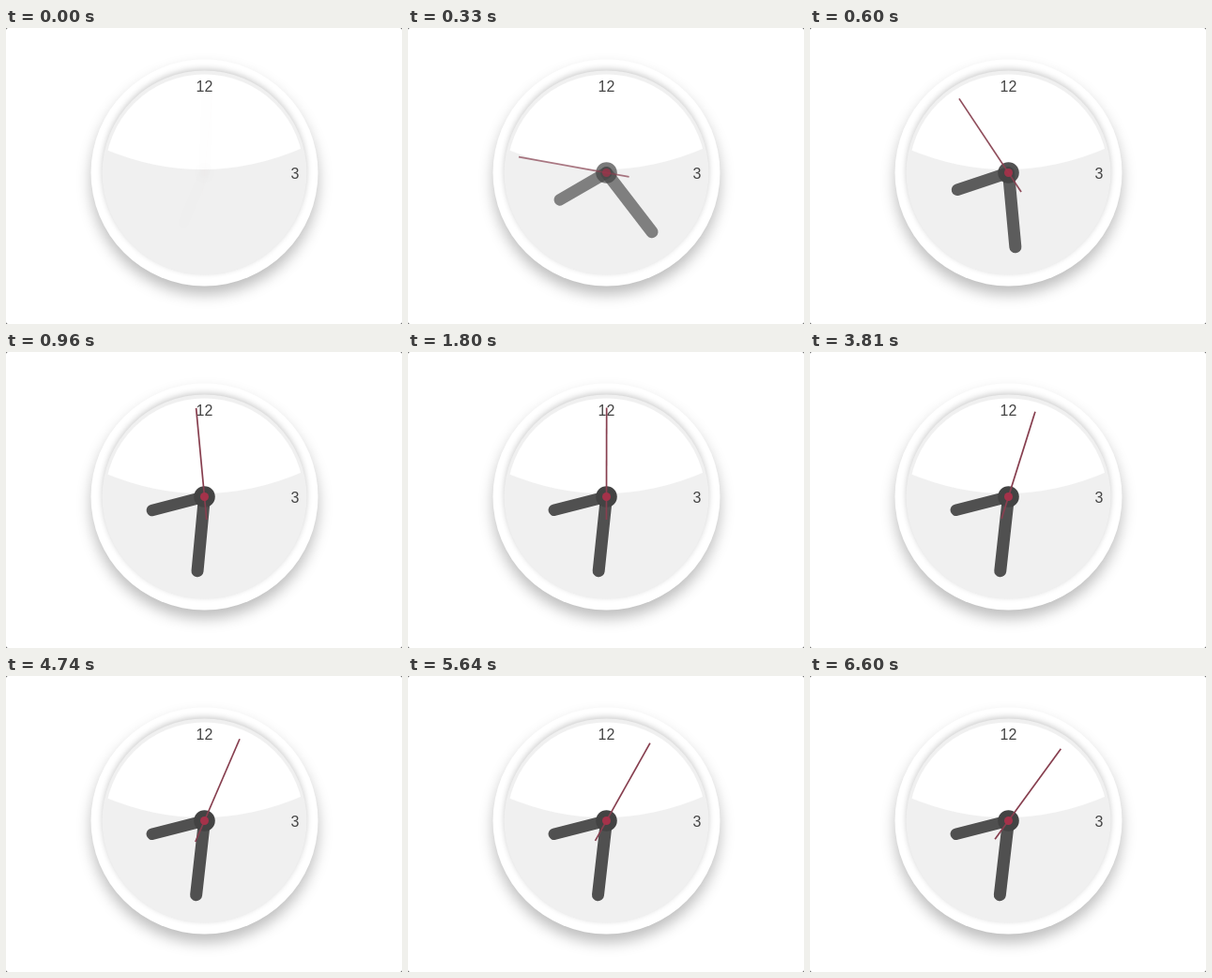
An HTML page with a canvas that plays this animation: 422x316 px, repeating every 6.75 s.

```html
<!DOCTYPE html>
<html lang="en">
<head>
<meta charset="utf-8">
<title>Wall clock</title>
<style>
html, body { margin: 0; width: 100%; height: 100%; overflow: hidden; background: #333; }
canvas { display: block; border-radius: 2px; }
</style>
</head>
<body>
<canvas id="stage" width="422" height="316"></canvas>
<script>
const LOOP = 6750, SETTLE = 1320, TICK_START = 1800, TICK = 900, TICK_MOVE = 300;
const CX = 211.5, CY = 154.5;
const ctx = document.getElementById('stage').getContext('2d');

function disc(r, fill, y = CY) {
  ctx.beginPath();
  ctx.arc(CX, y, r, 0, 2 * Math.PI);
  ctx.fillStyle = fill;
  ctx.fill();
}

function shadow(color, blur, dy) {
  ctx.shadowColor = color;
  ctx.shadowBlur = blur;
  ctx.shadowOffsetY = dy;
}

function hand(angle, from, to, width, color) {
  ctx.save();
  ctx.translate(CX, CY);
  ctx.rotate(angle * Math.PI / 180);
  ctx.beginPath();
  ctx.moveTo(0, -from);
  ctx.lineTo(0, -to);
  ctx.lineWidth = width;
  ctx.lineCap = width > 5 ? 'round' : 'butt';
  ctx.strokeStyle = color;
  ctx.stroke();
  ctx.restore();
}

// Springy cubic-bezier(.4, 2.08, .55, .44)
function spring(x) {
  if (x <= 0) return 0;
  if (x >= 1) return 1;
  const curve = (t, a, b) => 3 * (1 - t) ** 2 * t * a + 3 * (1 - t) * t * t * b + t ** 3;
  let lo = 0, hi = 1;
  for (let i = 0; i < 24; i++) {
    const mid = (lo + hi) / 2;
    if (curve(mid, 0.4, 0.55) < x) lo = mid; else hi = mid;
  }
  return curve(lo, 2.08, 0.44);
}

function drawBody() {
  ctx.fillStyle = '#fff';
  ctx.fillRect(0, 0, 422, 316);
  ctx.save();
  shadow('rgba(0,0,0,.26)', 15, 9);
  disc(121, '#fff');
  shadow('rgba(0,0,0,.2)', 6, -2);
  disc(109, '#f0f0f0');
  ctx.restore();

  // Bright upper half of the glass
  ctx.save();
  ctx.beginPath();
  ctx.arc(CX, CY + 1, 106, 0, 2 * Math.PI);
  ctx.clip();
  ctx.beginPath();
  ctx.moveTo(100, 40);
  ctx.lineTo(100, 127);
  ctx.quadraticCurveTo(CX, 176, 323, 125);
  ctx.lineTo(323, 40);
  ctx.fillStyle = '#fff';
  ctx.fill();
  ctx.restore();

  ctx.font = '16px "Liberation Sans", Arial, sans-serif';
  ctx.textAlign = 'center';
  ctx.fillStyle = '#444';
  ctx.fillText('12', CX, 68);
  ctx.fillText('3', 308, 161);
}

function drawHands(t) {
  const left = Math.max(0, 1 - t / SETTLE);
  const early = left ** 16, late = left ** 4.2;
  let second = -167 * left ** 2.64 - 190 * early;
  for (let start = TICK_START; start < LOOP; start += TICK) {
    second += 6 * spring((t - start) / TICK_MOVE);
  }
  const drift = Math.max(0, second) / 60;

  ctx.save();
  ctx.globalAlpha = 1 - late;
  hand(255.6 + drift / 12 - 53 * late, 0, 57.5, 12.5, '#505050');
  hand(186 + drift - 145 * late - 40 * early, 0, 79.7, 13, '#505050');
  disc(11.3, '#434343');
  hand(second, -24.5, 95, 1.7, '#873f4f');
  disc(4.5, '#a5324a');
  ctx.restore();
}

function frame() {
  drawBody();
  drawHands((performance.now() - begin) % LOOP);
  requestAnimationFrame(frame);
}

const begin = performance.now();
frame();
</script>
</body>
</html>
```
